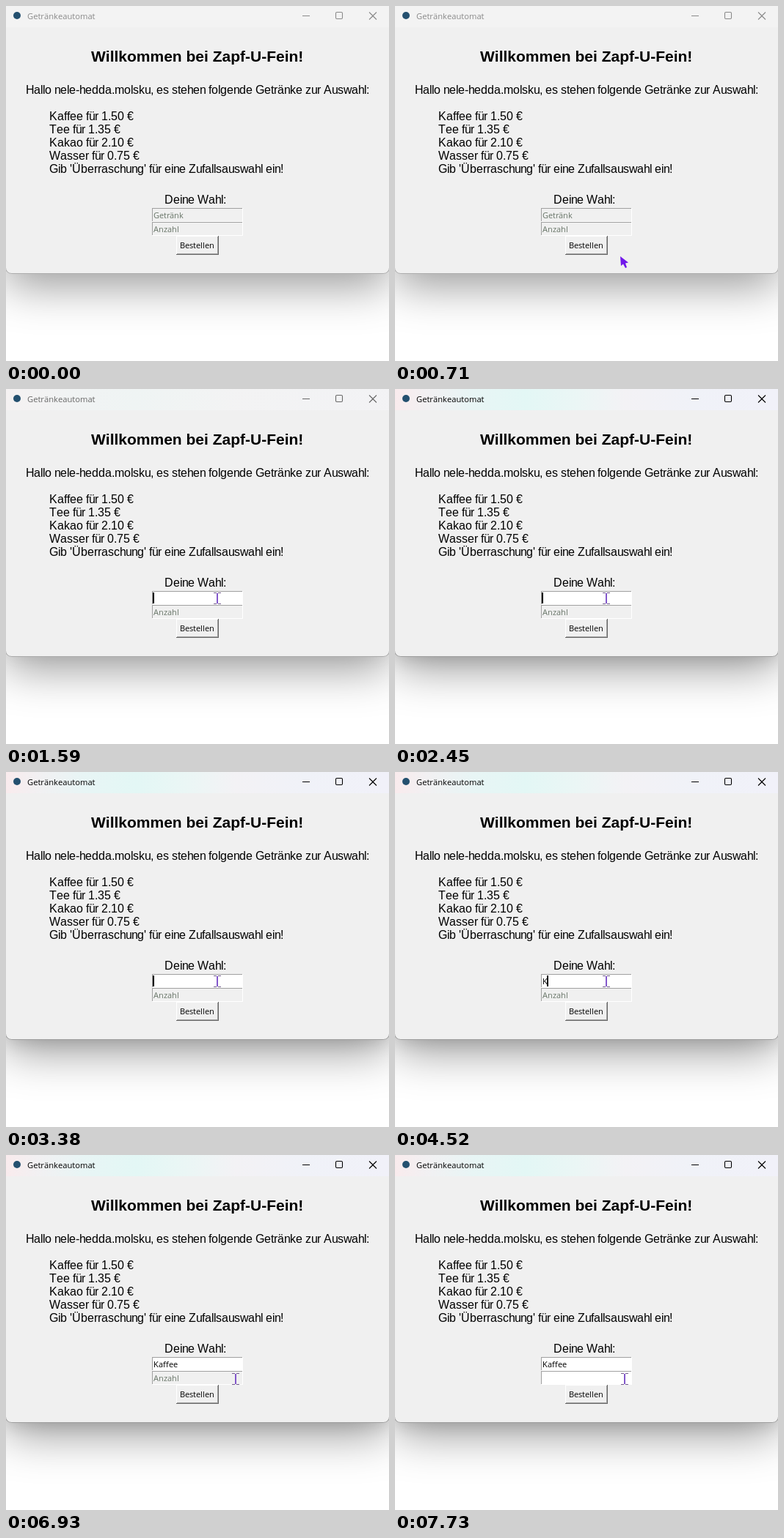
These frames come from a looping animation (522x485 px, 8000 ms). An HTML page with a canvas:

```html
<!DOCTYPE html>
<html lang="de">
<head>
<meta charset="utf-8">
<title>Getränkeautomat</title>
<style>
html, body { margin: 0; width: 100%; height: 100%; overflow: hidden; background: #fff; }
canvas { display: block; }
</style>
</head>
<body>
<canvas id="stage" width="522" height="485"></canvas>
<script>
const ctx = document.getElementById('stage').getContext('2d');
const W = 522, H = 485, LOOP = 8000;
const BOTTOM = 366, RADIUS = 8;
const SANS = '"Liberation Sans", Arial, sans-serif';
const UI = '"Open Sans", "Noto Sans", sans-serif';

const FOCUS = 1590, SWITCH = 7130;
const WORD = 'Kaffee';
const KEYS = [4520, 4720, 5190, 5380, 5720, 5860];
const BLINK = [[1590, 2190], [2450, 3040], [3380, 3970], [4320, 4920],
  [5190, 5790], [6130, 6720], [7070, 7130], [7130, 7730]];
const DRINKS = ['Kaffee für 1.50 €', 'Tee für 1.35 €', 'Kakao für 2.10 €',
  'Wasser für 0.75 €', "Gib 'Überraschung' für eine Zufallsauswahl ein!"];

// Pointer hotspot: time, x, y
const PATH = [[500, 392, 446], [570, 352, 398], [640, 324, 362], [704, 307, 342],
  [860, 296, 318], [1000, 290, 302], [1130, 288, 292], [1250, 288, 288],
  [1318, 288, 286], [6650, 288, 286], [6930, 313, 306], [7000, 313, 306],
  [7070, 318, 308], [7200, 316, 307], [7270, 313, 306]];

function rect(color, x, y, w, h) {
  ctx.fillStyle = color;
  ctx.fillRect(x, y, w, h);
}

function text(s, x, y, font, color = '#000') {
  ctx.font = font;
  ctx.fillStyle = color;
  ctx.fillText(s, x, y);
}

// Sets glyphs on whole pixels, like hinted desktop text; returns the end x.
function gridText(s, x, y, font, color = '#000', narrow = '') {
  ctx.font = font;
  ctx.fillStyle = color;
  for (const c of s) {
    ctx.fillText(c, x, y);
    const w = ctx.measureText(c).width;
    x += narrow.includes(c) ? Math.floor(w) : Math.round(w);
  }
  return x;
}

const body = (s, x, y) => gridText(s, x, y, '16px ' + SANS, '#000', 'ilhnuüwH');
const small = (s, x, y, color) => gridText(s, x, y, '500 11px ' + UI, color);

function windowShape(inset = 0) {
  ctx.beginPath();
  ctx.roundRect(-inset, -10, W + 2 * inset, BOTTOM + 10 - inset, [0, 0, RADIUS, RADIUS]);
}

function shadow(alpha, blur, dy) {
  ctx.save();
  ctx.shadowColor = `rgba(0,0,0,${alpha})`;
  ctx.shadowBlur = blur;
  ctx.shadowOffsetY = dy;
  ctx.fillStyle = '#f0f0f0';
  windowShape();
  ctx.fill();
  ctx.restore();
}

function titleBar(active) {
  rect('#f3f3f3', 0, 0, W, 29);
  const tint = ctx.createLinearGradient(0, 0, W, 0);
  [[0, '#f9ebed'], [.08, '#f2f0f2'], [.2, '#e8f5f5'], [.34, '#e3f7f5'],
    [.48, '#ebf6f5'], [.6, '#f3f2f5'], [.78, '#f0f2f8'], [1, '#f1f1f9']]
    .forEach(([p, c]) => tint.addColorStop(p, c));
  ctx.globalAlpha = active;
  rect(tint, 0, 0, W, 29);
  ctx.globalAlpha = 1;

  ctx.fillStyle = '#24506f';
  ctx.beginPath();
  ctx.arc(15, 13, 5, 0, 7);
  ctx.fill();

  const g = Math.round(138 * (1 - active));
  const ink = `rgb(${g},${g},${g})`;
  text('Getränkeautomat', 29, 18, '500 11.2px ' + UI, ink);
  ctx.strokeStyle = ink;
  ctx.lineWidth = 1.1;
  ctx.beginPath();
  ctx.moveTo(404, 13.5);
  ctx.lineTo(414, 13.5);
  ctx.roundRect(449.5, 8.5, 9, 9, 1.5);
  ctx.moveTo(495, 8.5);
  ctx.lineTo(505, 18.5);
  ctx.moveTo(505, 8.5);
  ctx.lineTo(495, 18.5);
  ctx.stroke();
}

function entry(y, hint, value, touched) {
  rect('#fff', 199, y, 124, 19);
  rect('#a0a0a0', 199, y, 123, 1);
  rect('#a0a0a0', 199, y, 1, 18);
  if (!touched) rect('#f0f0f0', 200, y + 1, 122, 17);
  return small(touched ? value : hint, 201, y + 14, touched ? '#000' : '#687568');
}

function button() {
  rect('#696969', 232, 314, 58, 26);
  rect('#fff', 232, 314, 57, 25);
  rect('#a0a0a0', 233, 315, 56, 24);
  rect('#f0f0f0', 233, 315, 55, 23);
  small('Bestellen', 237, 331);
}

function pointerAt(t) {
  const start = t < 6650 ? 500 : 6720;
  const step = t < 6650 ? 68.2 : 70;
  const q = start + Math.floor((t - start) / step + .01) * step;
  const i = PATH.findIndex(p => p[0] > q);
  if (i < 0) return PATH[PATH.length - 1].slice(1);
  if (i === 0) return PATH[0].slice(1);
  const [t0, x0, y0] = PATH[i - 1], [t1, x1, y1] = PATH[i];
  const k = (q - t0) / (t1 - t0);
  return [Math.round(x0 + (x1 - x0) * k), Math.round(y0 + (y1 - y0) * k)];
}

function pointer(x, y) {
  ctx.save();
  ctx.translate(x, y);
  if (x > 199 && x < 323 && y > 276 && y < 314) {
    for (const sy of [-8, 7]) {
      rect('#75608f', -5, sy, 4, 1);
      rect('#75608f', 1, sy, 4, 1);
    }
    rect('#8357cb', -1, -7, 2, 14);
  } else {
    ctx.beginPath();
    [[0, 0], [1, 13], [4, 10.5], [7, 16], [9, 15], [7, 9.5], [11, 8.5]]
      .forEach(p => ctx.lineTo(...p));
    ctx.closePath();
    ctx.fillStyle = '#7119ea';
    ctx.fill();
  }
  ctx.restore();
}

function drawWindow(active) {
  shadow(.41, 62, 15);
  if (active) shadow(.13 * active, 24, 2);
  ctx.save();
  windowShape();
  ctx.clip();
  rect('#f0f0f0', 0, 0, W, BOTTOM);
  titleBar(active);
  ctx.restore();

  windowShape(.5);
  ctx.strokeStyle = `rgba(0,0,0,${.28 + .06 * active})`;
  ctx.lineWidth = 1;
  ctx.stroke();
}

function draw(t) {
  const active = t < FOCUS ? 0 : Math.min(1, (Math.floor((t - FOCUS) / 70) + 1) / 4);
  rect('#fff', 0, 0, W, H);
  drawWindow(active);

  text('Willkommen bei Zapf-U-Fein!', 116, 76, 'bold 21px ' + SANS);
  body('Hallo nele-hedda.molsku, es stehen folgende Getränke zur Auswahl:', 27, 120);
  DRINKS.forEach((line, i) => body(line, 59, 156 + 18 * i));
  body('Deine Wahl:', 216, 270);

  const typed = WORD.slice(0, KEYS.filter(k => k <= t).length);
  const end = entry(276, 'Getränk', typed, t >= FOCUS);
  entry(295, 'Anzahl', '', t >= SWITCH);
  button();

  if (BLINK.some(([a, b]) => t >= a && t < b)) {
    if (t < SWITCH) rect('#000', end - 1, 278, 2, 15);
    else rect('#000', 200, 297, 2, 15);
  }
  if (t >= 500) pointer(...pointerAt(t));
}

ctx.fontKerning = 'none';
const begin = performance.now();
function frame() {
  draw((performance.now() - begin) % LOOP);
  requestAnimationFrame(frame);
}
frame();
</script>
</body>
</html>
```
